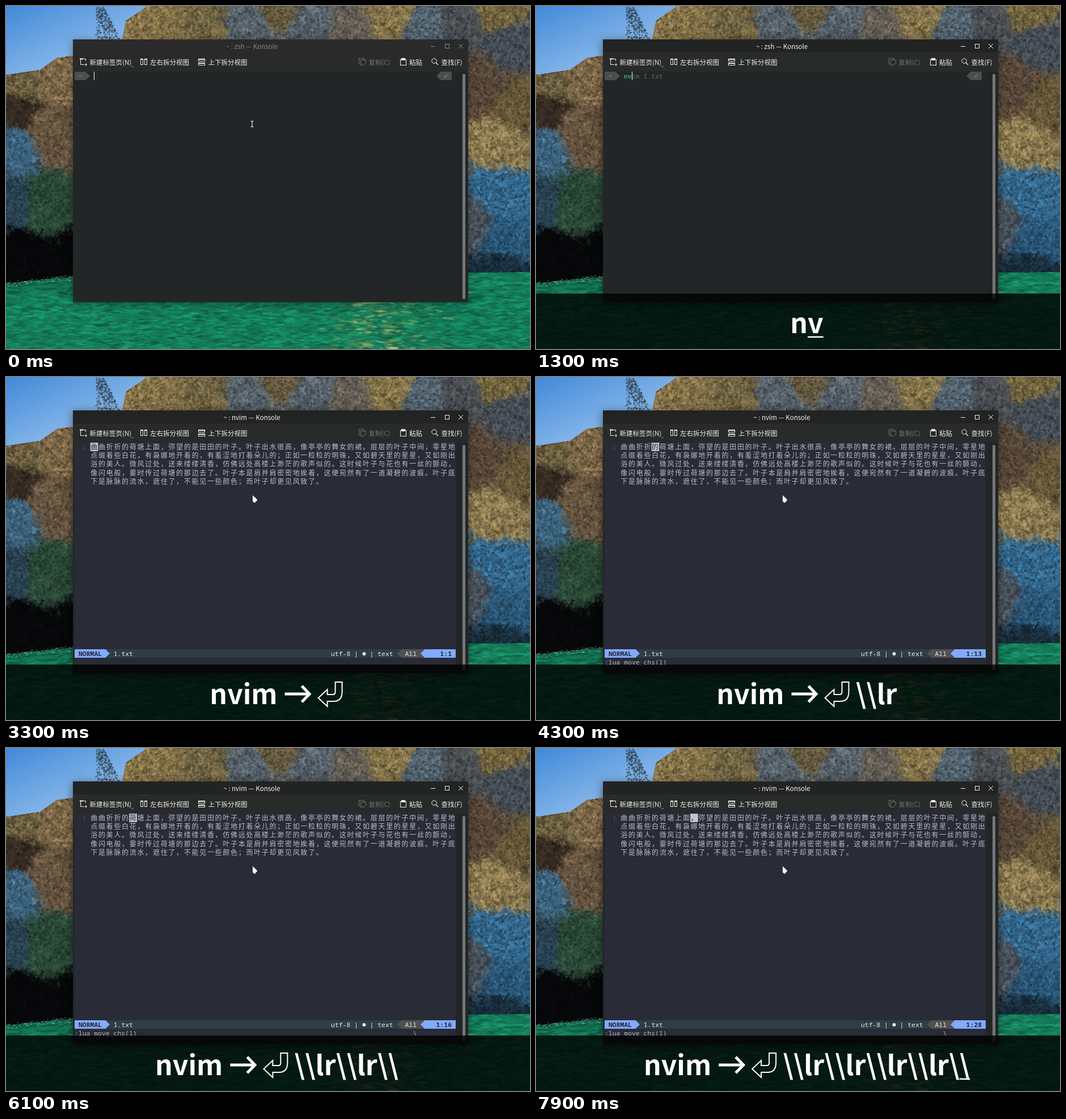
Recreate the animation shown at these times as an HTML page with a canvas. Size 924 px wide and 606 px high, loop 8 s.

```html
<!DOCTYPE html>
<html lang="zh-CN">
<head>
<meta charset="utf-8">
<title>Terminal demo</title>
<style>
html, body { margin: 0; width: 100%; height: 100%; overflow: hidden; background: #000; }
canvas { display: block; }
</style>
</head>
<body>
<canvas id="stage" width="924" height="606"></canvas>
<script>
const W = 924, H = 606, LOOP = 8000;
const CELL = 6.853, ROW = 15.25, TOP = 116, PER_ROW = 47;
const EDITOR_AT = 2200, TITLE_AT = 3300;
const SANS = '"Noto Sans CJK SC", "Noto Sans", sans-serif';
const MONO = '"Noto Sans Mono", "DejaVu Sans Mono", monospace';
const RETURN = new Path2D('M31 1h12v17q0 17-15 17h-11v9l-16-15 16-15v9h10q4 0 4-5z');
const stage = document.getElementById('stage').getContext('2d');
let c = stage;

const PROSE = '曲曲折折的荷塘上面，弥望的是田田的叶子。叶子出水很高，像亭亭的舞女的裙。层层的叶子中间，零星地' +
  '点缀着些白花，有袅娜地开着的，有羞涩地打着朵儿的；正如一粒粒的明珠，又如碧天里的星星，又如刚出' +
  '浴的美人。微风过处，送来缕缕清香，仿佛远处高楼上渺茫的歌声似的。这时候叶子与花也有一丝的颤动，' +
  '像闪电般，霎时传过荷塘的那边去了。叶子本是肩并肩密密地挨着，这便宛然有了一道凝碧的波痕。叶子底' +
  '下是脉脉的流水，遮住了，不能见一些颜色；而叶子却更见风致了。';
const WORDS = ['曲曲折折', '的', '荷塘', '上面'];

// Key presses: each run starts at a time and goes on at a steady pace
const keys = [];
function press(list, at, gap) {
  list.forEach((s, i) => keys.push({ s, at: Math.round((at + i * gap) / 100) * 100 }));
}
press(['n', 'v', 'im'], 1200, 100);
press(['→', '⏎'], 1800, 300);
for (const [at, gap] of [[3500, 200], [4600, 200], [5700, 233], [6600, 267], [7800, 100]]) {
  press(['\\', '\\', 'l', 'r'], at, gap);
}
const pressed = t => keys.filter(k => t >= k.at);

function rect(x, y, w, h, color) {
  c.fillStyle = color;
  c.fillRect(x, y, w, h);
}

function trace(pts) {
  c.beginPath();
  for (let i = 0; i < pts.length; i += 2) c.lineTo(pts[i], pts[i + 1]);
}

function poly(pts, color) {
  trace(pts);
  c.fillStyle = color;
  c.fill();
}

function line(pts, color, width = 1) {
  trace(pts);
  c.strokeStyle = color;
  c.lineWidth = width;
  c.stroke();
}

function box(x, y, w, h, color) {
  c.strokeStyle = color;
  c.lineWidth = 1;
  c.strokeRect(x + .5, y + .5, w, h);
}

function label(s, x, y, color) {
  c.font = `500 11.5px ${SANS}`;
  c.fillStyle = color;
  c.fillText(s, x, y);
}

function mono(s, x, y, color, weight = 500) {
  c.font = `${weight} 11.4px ${MONO}`;
  c.fillStyle = color;
  [...s].forEach((ch, i) => c.fillText(ch, x + i * CELL, y));
}

// Scenery: main tones at a few spots, spread by random daubs
const SPOTS = [
  [270, 25, 0x85734a], [350, 45, 0x6f6342], [430, 38, 0x566169], [540, 32, 0x566069], [480, 2, 0x655a3e],
  [605, 45, 0x645f56], [680, 15, 0x84734a], [740, 38, 0x53636f], [800, 30, 0x494d51], [870, 6, 0x75663f],
  [890, 65, 0x454d55], [840, 135, 0x58483a], [900, 180, 0x655739], [870, 240, 0x897850],
  [870, 335, 0x33668a], [880, 410, 0x2b5878], [815, 385, 0x4b535c], [870, 468, 0x1a2f3d],
  [25, 135, 0x685c3f], [100, 125, 0x7d6849], [12, 185, 0x352b22], [80, 220, 0x64533f], [6, 250, 0x3d647e],
  [15, 350, 0x2c4454], [65, 355, 0x2b4937], [20, 440, 0x08090b], [100, 455, 0x08090b]
];

let seed = 11;
function rnd() {
  seed = seed * 16807 % 2147483647;
  return seed / 2147483647;
}

function shade(hex, k) {
  return `rgb(${[16, 8, 0].map(s => Math.min(255, (hex >> s & 255) * k))})`;
}

function daub(x, y, rx, ry, turn, color) {
  c.fillStyle = color;
  c.beginPath();
  c.ellipse(x, y, rx, ry, turn, 0, 7);
  c.fill();
}

function toneAt(x, y) {
  let best = Infinity, tone = 0;
  for (const [sx, sy, hex] of SPOTS) {
    const d = Math.hypot(x - sx, y - sy) * (.8 + rnd() * .4);
    if (d < best) [best, tone] = [d, hex];
  }
  return tone;
}

const hidden = (x, y) => x > 135 && x < 798 && y > 76 && y < 506;

function paintLand() {
  c.save();
  trace([0, 122, 60, 113, 90, 92, 118, 88, 205, 60, 212, 26, 250, 0, W, 0, W, 474, 0, 492]);
  c.clip();
  rect(0, 0, W, H, '#4a4640');
  for (const [size, count, contrast, alpha] of [[14, 5000, .2, .8], [4.5, 16000, .7, .45], [1.7, 42000, 1.1, .5]]) {
    c.globalAlpha = alpha;
    for (let i = 0; i < count; i++) {
      const x = rnd() * W, y = rnd() * 495;
      if (hidden(x, y)) continue;
      const r = size * (.5 + rnd());
      daub(x, y, r * 1.5, r * .8, rnd() * 3, shade(toneAt(x, y), 1 + (rnd() - .5) * contrast));
    }
  }
  c.restore();
  // lone tree against the sky
  c.globalAlpha = .7;
  for (let i = 0; i < 240; i++) {
    const y = rnd() * 58, spread = 8 + y * .3;
    daub(166 + y * .25 + (rnd() - .5) * spread * 1.7, y + 2, 2, 1, rnd() * 3, shade(0x3a5162, .6 + rnd() * .7));
  }
  c.globalAlpha = 1;
}

function paintWater() {
  c.save();
  trace([0, 490, 118, 478, 815, 471, W, 470, W, H, 0, H]);
  c.clip();
  rect(0, 460, W, H, '#14795a');
  c.globalAlpha = .5;
  for (let i = 0; i < 6500; i++) {
    const x = rnd() * W, y = 468 + rnd() * 138;
    if (hidden(x, y)) continue;
    const gold = rnd() < .4 * Math.exp(-(((x - 665) / 75) ** 2));
    const depth = x < 150 ? Math.min(1, .6 + (y - 475) / 110) : 1;
    const r = .6 + rnd() * 1.6;
    daub(x, y, r * 5, r, (rnd() - .5) * .5, shade(gold ? 0x8d9c5e : 0x15805a, depth * (.6 + rnd() * .8)));
  }
  c.restore();
  for (let i = 0; i < 90; i++) {
    const x = rnd() * 118;
    rect(x, 491 - x * .1 + (rnd() - .5) * 10, 1 + rnd() * 2, 1, `rgba(215,225,225,${.2 + rnd() * .6})`);
  }
}

function paintScenery() {
  const sky = c.createLinearGradient(0, 0, 60, 130);
  sky.addColorStop(0, '#4189d8');
  sky.addColorStop(1, '#8bb9ea');
  rect(0, 0, W, H, sky);
  paintLand();
  paintWater();
}

function windowFrame(t) {
  const active = t >= 100;
  c.save();
  c.shadowColor = `rgba(0,0,0,${active ? .5 : .35})`;
  c.shadowBlur = 16;
  c.shadowOffsetY = 3;
  rect(118, 59, 697, 464.5, '#232627');
  c.restore();
  rect(118, 59, 697, 23, active ? '#222323' : '#2a2a2b');
  rect(118, 82, 697, 34, '#292a2a');

  const tone = active ? '#f4f4f4' : '#858687';
  c.textAlign = 'center';
  label(`~ : ${t < TITLE_AT ? 'zsh' : 'nvim'} — Konsole`, 433.5, 76, tone);
  c.textAlign = 'left';
  line([749, 71.5, 757, 71.5], tone);
  box(774, 67, 7, 7, tone);
  line([798, 67, 806, 75], tone);
  line([806, 67, 798, 75], tone);
  toolbar();
  rect(799, 116, 1, 407, '#1d2021');
  c.fillStyle = '#747677';
  c.beginPath();
  c.roundRect(805, 120, 5, 398, 2.5);
  c.fill();
}

function toolbar() {
  const ink = '#f0f0f0', dim = '#707273';
  // new tab
  line([138, 103.5, 131.5, 103.5, 131.5, 93.5, 140.5, 93.5, 140.5, 97], ink);
  line([130, 93.5, 136, 93.5], ink, 2);
  line([139, 103.5, 143, 103.5], ink);
  line([141, 101, 141, 106], ink);
  label('新建标签页(N)', 147.5, 103.5, ink);
  line([221, 106, 223, 108, 225, 106], '#a0a0a0');
  // split views
  for (const i of [0, 7]) {
    box(237 + i, 93, 4, 10, ink);
    rect(237 + i, 93, 5, 2, ink);
    box(339, 93 + i, 11, 4, ink);
    rect(339, 93 + i, 12, 2, ink);
  }
  label('左右拆分视图', 254, 103.5, ink);
  label('上下拆分视图', 356.5, 103.5, ink);
  // copy
  line([625, 102.5, 622.5, 102.5, 622.5, 92.5, 631.5, 92.5, 631.5, 95], dim);
  line([625.5, 95.5, 634.5, 95.5, 634.5, 101, 631, 104.5, 625.5, 104.5, 625.5, 95.5], dim);
  label('复制(C)', 639.5, 103.5, dim);
  // paste
  box(695, 94, 10, 10, ink);
  rect(697, 92, 7, 4, ink);
  label('粘贴', 711, 103.5, ink);
  // search
  c.beginPath();
  c.arc(755, 97, 4.2, 0, 7);
  c.stroke();
  line([758, 100, 762, 104], ink, 1.3);
  label('查找(F)', 767.5, 103.5, ink);
}

// A bar with a pointed end: tip at x, flat end at x + w (w < 0 points right)
function tag(x, w, y, color) {
  const neck = x + Math.sign(w) * 7.5;
  poly([x, y + 7.5, neck, y, x + w, y, x + w, y + 15, neck, y + 15], color);
}

function shell(t) {
  tag(148, -27, TOP, '#4c4f50');
  mono('~', 128, 127.5, '#2da4e6', 700);
  tag(759, 27, TOP, '#4c4f50');
  line([772.5, 124, 774.5, 126, 778, 121], '#4aa52c', 1.4);

  const word = pressed(t).map(k => k.s).join('').slice(0, 4);
  const accepted = t >= 1800;
  mono(word, 155, 127.5, '#1fae72', 700);
  if (word) mono('nvim 1.txt'.slice(word.length), 155 + word.length * CELL, 127.5, accepted ? '#8580a0' : '#686a78');
  const at = accepted ? 10 : word.length;
  if (t < 2100) rect(Math.round(155 + at * CELL), TOP, 1, 15, '#fcfcfc');
  else rect(121, TOP + 15, 1, 15, '#fcfcfc');
}

function editor(t) {
  const typed = pressed(t);
  const done = typed.filter(k => k.s === 'r').length;
  const at = WORDS.slice(0, done).join('').length;
  rect(121, TOP, 672, 396, '#292b37');
  mono('1', 134.7, 127.5, '#4a4e63');
  rect(148.7 + at * CELL * 2, TOP, CELL * 2, 15, '#bcc5d2');
  c.font = `500 12px ${SANS}`;
  [...PROSE].forEach((ch, i) => {
    c.fillStyle = i === at ? '#292b37' : '#b9bccb';
    c.fillText(ch, 149.3 + i % PER_ROW * CELL * 2, 127.8 + Math.floor(i / PER_ROW) * ROW);
  });

  // status line
  const y = 492.8, light = '#e6eaee', dark = '#232838', blue = '#82aaff';
  rect(121, 481, 672, 15, '#2f3d44');
  tag(183, -62, 481, blue);
  mono('NORMAL', 128, y, dark, 700);
  mono('1.txt', 189.7, y, light);
  mono('utf-8 |   | text', 573, y, light);
  daub(631.5, 489, 3, 3, 0, light);
  tag(690, 50, 481, '#515151');
  mono('All', 703.5, y, light);
  tag(731, 62, 481, blue);
  const pos = `1:${1 + at * 3}`;
  mono(pos, 786 - pos.length * CELL, y, dark, 700);

  // command line
  const pending = { '\\': '\\', l: '\\l' }[typed[typed.length - 1].s];
  if (done) mono(':lua move_chs(1)', 121, 508, '#b4b7c2');
  if (pending) mono(pending, 717.5, 508, '#b4b7c2');
}

function pointer(t) {
  if (t < 1100) {
    line([434, 203, 434, 214], '#f4f4f4', 1.2);
    for (const y of [203.5, 213.5]) line([431.5, y, 436.5, y], '#f4f4f4');
  } else if (t >= EDITOR_AT) {
    poly([435, 209, 442.5, 216, 442.5, 219, 440, 220, 440, 222, 437.5, 222, 435, 219.5], '#fff');
  }
}

// Drawn keys: space before, width, space after
const SIGNS = {
  '→': { lead: 12, width: 46, after: 1, draw(x) {
    line([x + 1, 560, x + 44, 560], '#fff', 5);
    line([x + 31, 546, x + 44.5, 560, x + 31, 574], '#fff', 5);
  } },
  '⏎': { lead: 12, width: 46, after: 9, draw(x) {
    c.save();
    c.translate(x, 538);
    c.strokeStyle = '#fff';
    c.lineWidth = 2;
    c.stroke(RETURN);
    c.restore();
  } }
};

function caption(t) {
  const shown = pressed(t);
  if (!shown.length) return;
  rect(0, 508, W, 98, 'rgba(0,0,0,.8)');
  c.font = `700 48px ${SANS}`;
  let x = 0;
  const parts = shown.map((k, i) => {
    const sign = SIGNS[k.s];
    const last = i === shown.length - 1;
    const width = sign ? sign.width : c.measureText(k.s).width;
    if (sign) x += sign.lead;
    const part = { s: k.s, sign, x, width, marked: last && t < k.at + 200 };
    x += width + (sign && !last ? sign.after : 0);
    return part;
  });
  const left = 477.5 - x / 2;
  for (const p of parts) {
    c.fillStyle = '#fff';
    if (p.sign) p.sign.draw(left + p.x);
    else c.fillText(p.s, left + p.x, 578);
    if (p.marked) rect(left + p.x, 583.5, p.width, 2.5, '#fff');
  }
}

const scenery = document.createElement('canvas');
scenery.width = W;
scenery.height = H;
c = scenery.getContext('2d');
paintScenery();
c = stage;

const start = performance.now();
function draw() {
  const t = (performance.now() - start) % LOOP;
  c.drawImage(scenery, 0, 0);
  windowFrame(t);
  if (t < EDITOR_AT) shell(t);
  else editor(t);
  pointer(t);
  caption(t);
  requestAnimationFrame(draw);
}
draw();
</script>
</body>
</html>
```
